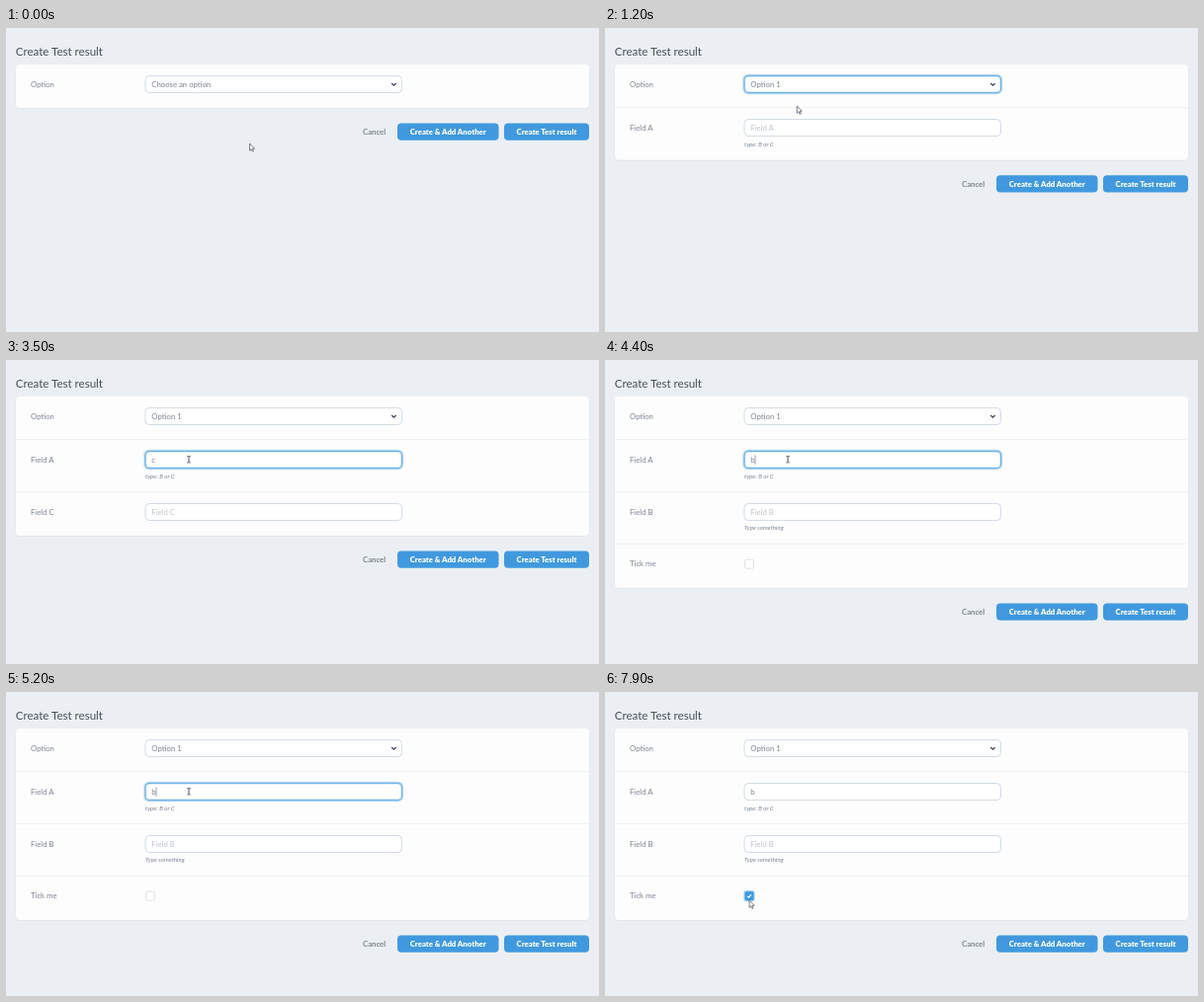
Recreate the animation shown at these times as an HTML page. Size 600 px wide and 308 px high, loop 8000 ms.

```html
<!DOCTYPE html>
<html lang="en">
<head>
<meta charset="utf-8">
<title>Create form</title>
<style>
  html, body { margin: 0; width: 100%; height: 100%; overflow: hidden; background: #ebeff3; }
  svg { display: block; width: 100%; height: 100%; }
  text { font: 7.75px Lato, "Open Sans", sans-serif; fill: #7c858e; white-space: pre; }
  .title { font-size: 11.55px; fill: #46505c; }
  .hint { fill: #bfc5cc; }
  .help { font-size: 6.1px; font-style: italic; }
  .strong { font-weight: 700; }
  .button { font-weight: 900; fill: #fff; text-anchor: middle; }
</style>
</head>
<body>
<svg id="stage" viewBox="0 0 600 308"></svg>
<script>
const LOOP = 8000, STEP = 100, BLUE = '#4099de';
const stage = document.getElementById('stage');

// Pointer keys: [time, x, y]
const path = [
  [0, 246.5, 117], [100, 246, 112], [400, 240, 58], [500, 238, 57],
  [900, 196, 78], [1000, 194.2, 79], [1200, 194.2, 79], [1400, 191, 87],
  [1500, 191, 87], [1900, 185, 100.7], [6200, 185, 100.7], [6500, 186.5, 160],
  [7000, 186.5, 160], [7300, 155, 186], [7500, 130, 203], [7700, 146, 211.2],
  [8000, 146, 211.2]
];

// Latest value whose start time has passed
const at = (t, keys) => keys.filter(k => k[0] <= t).pop()[1];
const between = (t, from, to) => t >= from && t < to;

function pointerAt(t) {
  const i = path.findIndex(k => k[0] > t);
  const [t0, x0, y0] = path[i - 1], [t1, x1, y1] = path[i];
  const p = (t - t0) / (t1 - t0), e = p * p * (3 - 2 * p);
  return [x0 + (x1 - x0) * e, y0 + (y1 - y0) * e];
}

const text = (x, y, s, cls = '') => `<text x="${x}" y="${y}" class="${cls}">${s}</text>`;
const rect = (x, y, w, h, r, attrs) =>
  `<rect x="${x}" y="${y}" width="${w}" height="${h}" rx="${r}" ${attrs}/>`;

function box(y, focused) {
  const glow = focused
    ? rect(139.8, y - 9.7, 261.9, 19.4, 5, `fill="none" stroke="${BLUE}" stroke-opacity=".3" stroke-width="1.2"`) : '';
  return glow + rect(141, y - 8.5, 259.5, 17, 4,
    `fill="#fff" stroke="${focused ? '#6fb2e6' : '#c8d3dd'}" stroke-width="${focused ? 1.5 : .8}"`);
}

function field(y, name, value, focused, caret) {
  return text(25, y + 2.7, name) + box(y, focused)
    + text(147.3, y + 2.7, value || name, value ? '' : 'hint')
    + (caret ? rect(147.4 + value.length * 4.2, y - 4.6, .7, 9.4, 0, 'fill="#6d7680"') : '');
}

function select(value, focused) {
  return text(25, 59.7, 'Option') + box(57, focused) + text(147.3, 59.7, value)
    + '<path d="M390.2 56l2.2 2.2 2.2-2.2" fill="none" stroke="#3c4655" stroke-width="1.3"/>';
}

function menu() {
  const rows = ['Choose an option', 'Option 1', 'Option 2'];
  return rect(141, 66.5, 260, 31.5, 0, 'fill="#fff" stroke="#c4cad1" stroke-width=".7"')
    + rect(141.4, 76.8, 259.2, 10.4, 0, 'fill="#dfe4ea"')
    + rows.map((s, i) => text(147.3, 74.5 + i * 10.4, s)).join('');
}

function checkbox(checked) {
  const mark = checked
    ? '<path d="M144 206.8l1.4 1.4 2.7-3" fill="none" stroke="#fff" stroke-width="1.1"/>' : '';
  const ring = checked
    ? rect(140.3, 201.1, 11.2, 11.2, 2.5, `fill="${BLUE}" fill-opacity=".45"`) : '';
  return text(25, 209.2, 'Tick me') + ring
    + rect(141.5, 202.2, 9, 9, 1.7, checked ? `fill="${BLUE}"` : 'fill="#fff" stroke="#d3dae1" stroke-width=".8"')
    + mark;
}

function actions(y) {
  const button = (x, w, s) => rect(x, y, w, 17.3, 4, `fill="${BLUE}"`)
    + text(x + w / 2, y + 11.4, s, 'button');
  return text(361, y + 11.4, 'Cancel', 'strong')
    + button(396, 102.5, 'Create &amp; Add Another') + button(504, 86, 'Create Test result');
}

function pointer(t) {
  const [x, y] = pointerAt(t);
  const beam = between(t, 1800, 7100);
  const shape = beam
    ? '<path d="M-1.7-3.3Q-.3-3.3 0-2.6Q.3-3.3 1.7-3.3M0-2.6V2.6M-1.7 3.3Q-.3 3.3 0 2.6Q.3 3.3 1.7 3.3" fill="none" stroke="#3f454d" stroke-width=".95"/>'
    : '<path d="M0 0V7.2L1.7 5.7 2.8 8.2 4 7.7 2.9 5.2H5.1Z" fill="#f6f6f8" stroke="#555a62" stroke-width=".75"/>';
  return `<g transform="translate(${x} ${y})">${shape}</g>`;
}

function scene(t) {
  const typed = at(t, [[0, ''], [3000, 'c'], [3900, ''], [4400, 'b'], [4800, 'bb'], [5200, 'b']]);
  const focus = at(t, [[0, ''], [400, 'select'], [1800, 'A'], [6700, 'B'], [7700, 'tick']]);
  const caretA = focus === 'A' && !between(t, 2500, 3000) && !between(t, 3500, 3900) && t < 5900;
  const caretB = focus === 'B' && t < 7200;
  const chosen = t >= 1200;
  const bottom = !chosen ? 81 : typed === 'c' ? 178 : typed === 'b' ? 231 : 133.7;

  let body = select(chosen ? 'Option 1' : 'Choose an option', focus === 'select');
  const lines = [];
  if (chosen) {
    lines.push(80.7);
    body += field(101, 'Field A', typed, focus === 'A', caretA) + text(141, 119.8, 'type: B or C', 'help');
  }
  if (typed === 'c') {
    lines.push(133.5);
    body += field(154, 'Field C', '', false, false);
  }
  if (typed === 'b') {
    lines.push(133.5, 186.2);
    body += field(154, 'Field B', '', focus === 'B', caretB)
      + text(141, 172.4, 'Type something', 'help') + checkbox(focus === 'tick');
  }
  return text(9.8, 28.3, 'Create Test result', 'title')
    + rect(9.5, 37.5, 581, bottom - 36.5, 4.5, 'fill="#dde3e9" fill-opacity=".7"')
    + rect(10, 37, 580, bottom - 37, 4, 'fill="#fdfdfe"')
    + lines.map(y => `<path d="M10 ${y}H590" stroke="#eceff3" stroke-width=".9"/>`).join('')
    + body + actions(bottom + 15.5)
    + (between(t, 500, 1200) ? menu() : '') + pointer(t);
}

let shown = -1;
function draw(now) {
  const t = Math.floor(now % LOOP / STEP) * STEP;
  if (t !== shown) stage.innerHTML = scene(shown = t);
  requestAnimationFrame(draw);
}
draw(0);
</script>
</body>
</html>
```
